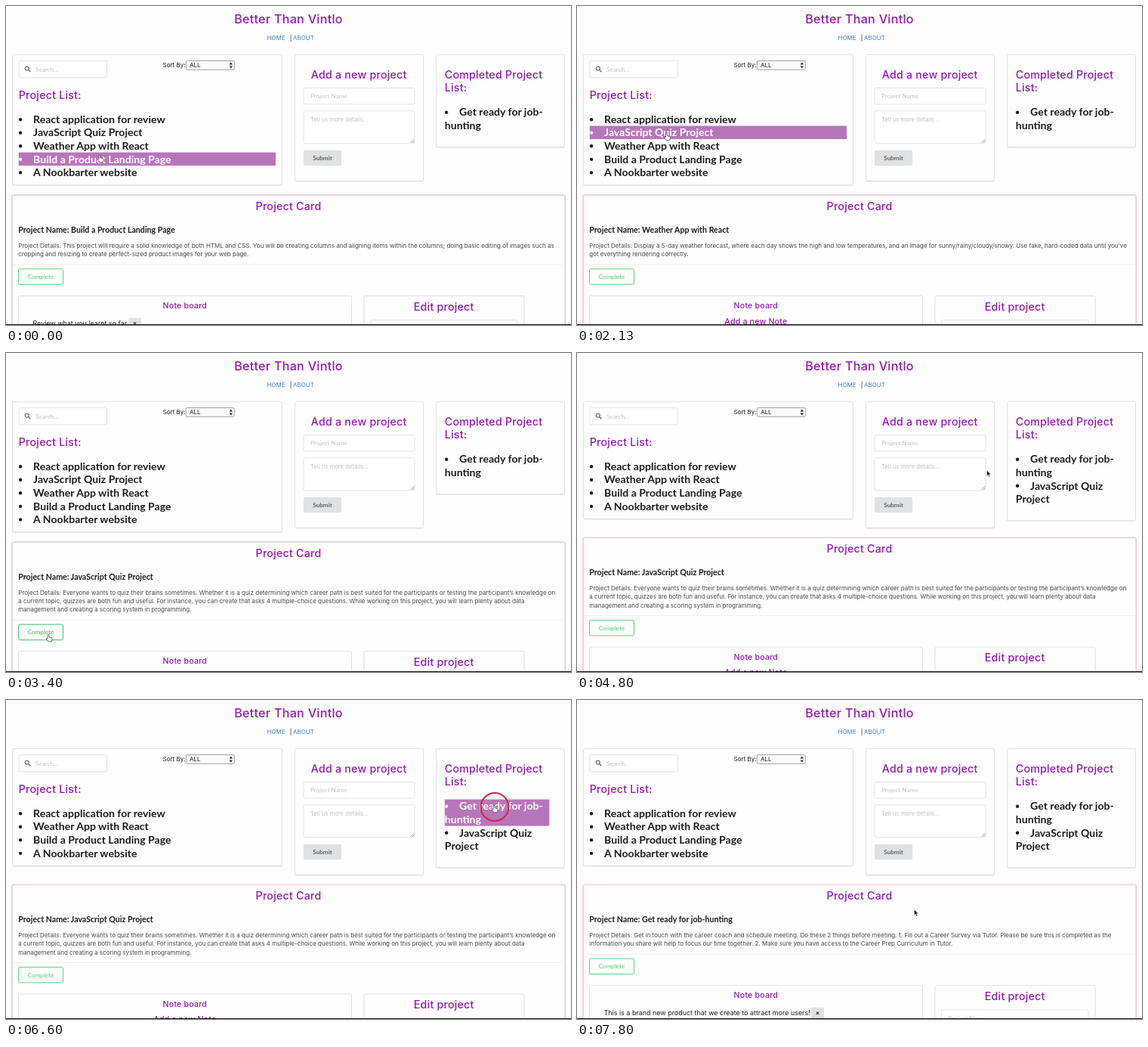
An HTML page for the animation above (7860 ms loop, 748x422 px).

```html
<!DOCTYPE html>
<html lang="en">
<head>
<meta charset="utf-8">
<title>Project board</title>
<style>
  html, body { margin: 0; height: 100%; overflow: hidden; background: #fefefe; }
  svg { display: block; width: 100vw; height: 100vh; }
  text { font: 8px Inter, sans-serif; fill: #1b1c1d; white-space: pre; }
  .title { font-size: 16.1px; }
  .h2 { font-size: 14.15px; }
  .h3 { font-size: 10.6px; }
  .title, .h2, .h3 { font-weight: 500; letter-spacing: .018em; fill: #9319b1; }
  .item { font: bold 14.08px Lato, sans-serif; }
  .name { font: bold 10.63px Lato, sans-serif; }
  .button { font: bold 8.15px Lato, sans-serif; fill: #616263; }
  .hint { font: 8.2px Lato, sans-serif; fill: #c3c3c3; }
  .area { font-size: 7.7px; fill: #c3c3c3; }
  .link { fill: #4183c4; }
  .details { font-size: 7.99px; fill: #484848; }
  .note { font-size: 8.95px; }
  .mid { text-anchor: middle; }
  .on { fill: #fff; }
</style>
</head>
<body>
<svg id="stage" viewBox="0 0 748 422"></svg>
<script>
const LOOP = 7860, STEP = 200 / 3, ROW = 17.55, LINE = 11.3;
const stage = document.getElementById('stage');

const build = {
  name: 'Build a Product Landing Page',
  note: 'Review what you learnt so far', noteEnd: 162,
  lines: ['This project will require a solid knowledge of both HTML and CSS. You will be creating columns and aligning items within the columns; doing basic editing of images such as',
    'cropping and resizing to create perfect-sized product images for your web page.']
};
const weather = {
  name: 'Weather App with React',
  lines: ['Display a 5-day weather forecast, where each day shows the high and low temperatures, and an image for sunny/rainy/cloudy/snowy. Use fake, hard-coded data until you’ve',
    'got everything rendering correctly.']
};
const quiz = {
  name: 'JavaScript Quiz Project',
  lines: ['Everyone wants to quiz their brains sometimes. Whether it is a quiz determining which career path is best suited for the participants or testing the participant’s knowledge on',
    'a current topic, quizzes are both fun and useful. For instance, you can create that asks 4 multiple-choice questions. While working on this project, you will learn plenty about data',
    'management and creating a scoring system in programming.']
};
const job = {
  name: 'Get ready for job-hunting',
  note: 'This is a brand new product that we create to attract more users!', noteEnd: 310,
  lines: ['Get in touch with the career coach and schedule meeting. Do these 2 things before meeting: 1. Fill out a Career Survey via Tutor. Please be sure this is completed as the',
    'information you share will help to focus our time together. 2. Make sure you have access to the Career Prep Curriculum in Tutor.']
};

// Pointer hotspot: [ms, x, y]
const path = [
  [0, 124, 197], [600, 122, 184], [2000, 122, 184], [2130, 118.5, 168], [2260, 118, 166],
  [2730, 118, 166], [3130, 62, 366], [3400, 56, 372], [4340, 56, 372], [4460, 190, 300],
  [4540, 190, 300], [4660, 430, 190], [4730, 480, 176], [4800, 542.5, 155], [5060, 650, 180],
  [5600, 650, 180], [6400, 646, 139], [7270, 646, 139], [7800, 446.4, 277]
];
// Mouse presses: [down, up]
const clicks = [[930, 1060], [2400, 2530], [3730, 3860], [6530, 6800]];

function pointerAt(t) {
  const i = path.findIndex(p => p[0] > t);
  if (i < 0) return path[path.length - 1].slice(1);
  const [t0, x0, y0] = path[i - 1], [t1, x1, y1] = path[i];
  const k = (t - t0) / (t1 - t0);
  return [x0 + (x1 - x0) * k, y0 + (y1 - y0) * k];
}

const text = (x, y, s, cls = '') => `<text x="${x}" y="${y}" class="${cls}">${s}</text>`;
const rect = (x, y, r, b, fill, stroke = 'none', more = '') =>
  `<rect x="${x}" y="${y}" width="${r - x}" height="${b - y}" fill="${fill}" stroke="${stroke}" ${more}/>`;
const box = (x, y, r, b, stroke = '#dedede') => rect(x, y, r, b, '#fff', stroke, 'rx="2" stroke-width=".8"');
const panel = (x, y, r, b) =>
  rect(x, y + 1, r, b + 1, '#e4e4e5', '#eeeeef', 'rx="2"') + rect(x, y, r, b, '#fefefe', '#dcdcdd', 'rx="2" stroke-width=".8"');
const shape = (d, fill, stroke = 'none', width = .7) =>
  `<path d="${d}" fill="${fill}" stroke="${stroke}" stroke-width="${width}" stroke-linejoin="round"/>`;

// One list entry; later lines start at the bullet's edge
function entry(x, y, r, lines, hot) {
  const cls = hot ? 'item on' : 'item';
  return (hot ? rect(x, y, r, y + ROW * lines.length, '#b876ba') : '') +
    `<circle cx="${x + 2.3}" cy="${y + 9.2}" r="2.2" fill="${hot ? '#f6e9f6' : '#1b1c1d'}"/>` +
    lines.map((s, i) => text(i ? x : x + 19.3, y + 13.9 + i * ROW, s, cls)).join('');
}

function header() {
  return text(374, 22.8, 'Better Than Vintlo', 'title mid') +
    text(345.5, 44.7, 'HOME', 'link') + text(375.7, 44.7, '|') + text(380, 44.7, 'ABOUT', 'link');
}

function searchBar() {
  return box(17, 72.3, 133.5, 94.8) +
    '<circle cx="27.8" cy="82.6" r="2.5" fill="none" stroke="#777" stroke-width="1.3"/>' +
    shape('M29.7 84.5l2.6 2.6', 'none', '#777', 1.6) +
    text(39, 87, 'Search...', 'hint') + text(207.5, 81, 'Sort By:') +
    rect(238.3, 72.5, 302.3, 84.3, '#fafafa', '#8d8d8d', 'rx="1.5" stroke-width=".8"') +
    text(243, 81.2, 'ALL') +
    shape('M295.6 77.4l2.2-3 2.2 3zM295.6 79.4l2.2 3 2.2-3z', '#222');
}

function newProject() {
  return panel(382.5, 64.3, 552.5, 231.3) + text(467.2, 95.8, 'Add a new project', 'h2 mid') +
    box(394, 108.4, 541, 130) + text(403, 122, 'Project Name', 'hint') +
    box(394, 138.7, 541, 181.8) + text(403, 153, 'Tell us more details...', 'area') +
    shape('M535.5 181l5-5M538 181l2.5-2.5', 'none', '#777') +
    rect(394, 190.8, 444, 211.3, '#e0e1e2', 'none', 'rx="2"') + text(419, 204, 'Submit', 'button mid');
}

function card(project, shift, hotButton) {
  const { name, lines, note, noteEnd } = project;
  const top = 250.3 + shift;
  const y = 383.4 + shift + (lines.length - 2) * LINE;
  const green = hotButton ? '#2fb650' : '#48cb6b';
  let out = rect(7.6, top - .5, 740.7, 440, '#fefefe', '#f1c3cd', 'rx="2.5"') +
    rect(8.4, top + .2, 739.9, 440, '#fefefe', '#e2c9ce', 'rx="2" stroke-width=".8"') +
    text(374, top + 19.6, 'Project Card', 'h2 mid') +
    text(16.3, top + 49.5, 'Project Name: ' + name, 'name') +
    lines.map((s, i) => text(16.3, top + 69.3 + i * LINE, (i ? '' : 'Project Details: ') + s, 'details')).join('') +
    rect(8.7, y - 41.8, 739.6, y - 41, '#ececec') +
    rect(16.5, y - 35.6, 75.6, y - 15.1, '#fff', green, 'rx="2" stroke-width=".9"') +
    `<text x="46" y="${y - 22.4}" class="button mid" style="fill:${green};font-weight:400">Complete</text>` +
    panel(16.5, y, 457.5, 440) + text(236.8, y + 16.7, 'Note board', 'h3 mid') +
    panel(474, y, 686, 440) + text(579.7, y + 19.4, 'Edit project', 'h2 mid') +
    box(482.5, y + 32.2, 677, y + 53.8) + text(491.5, y + 46, 'Project Name', 'hint');
  if (note) {
    out += text(35.5, y + 39.2, note, 'note') +
      rect(noteEnd, y + 29, noteEnd + 17, y + 44, '#e0e1e2', 'none', 'rx="2"') +
      shape(`M${noteEnd + 6.8} ${y + 34.8}l3.5 3.5m0-3.5l-3.5 3.5`, 'none', '#555', 1.3);
  } else {
    out += text(236.8, y + 37.4, 'Add a new Note', 'h3 mid');
  }
  return out;
}

function cursor(x, y, hand) {
  const drawing = hand
    ? shape('M-.9 .8q.9-1.7 1.8 0v3l3.2 .8q1.3 .4 1 1.8l-.8 3.4h-4.4l-2.8-3.8q0-1.4 1.9-.4z', '#fff', '#333')
    : shape('M0 0v8l1.9-1.7 1.2 2.8 1.3-.6-1.2-2.7h2.5z', '#111', '#fff', .6);
  return `<g transform="translate(${x} ${y})">${drawing}</g>`;
}

function ring(t, x, y) {
  return clicks.filter(([down, up]) => t >= down && t < up + 260).map(([, up]) =>
    `<circle cx="${x + 1}" cy="${y + 2.5}" r="18.5" fill="none" stroke="#cf2744" stroke-width="2" opacity="${Math.min(1, 1 - (t - up) / 260)}"/>`).join('');
}

function render(t) {
  const [x, y] = pointerAt(t);
  const finished = t >= 3860;
  const project = t < 1060 ? build : t < 2530 ? weather : t < 6800 ? quiz : job;
  const todo = ['React application for review', quiz.name, weather.name, build.name, 'A Nookbarter website']
    .filter(s => !finished || s !== quiz.name);
  const done = [['Get ready for job-', 'hunting']];
  if (finished) done.push(['JavaScript Quiz', 'Project']);

  const shift = finished ? -5.7 : 0;
  const within = (l, top, r, b) => x >= l && x < r && y >= top && y < b;
  let hand = false;
  const list = (items, left, top, right) => items.map((lines, i) => {
    const rowTop = top + i * lines.length * ROW;
    const hot = within(left, rowTop, right, rowTop + lines.length * ROW);
    hand = hand || hot;
    return entry(left, rowTop, right, lines, hot);
  }).join('');

  const buttonTop = 347.8 + shift + (project.lines.length - 2) * LINE;
  const hotButton = within(16.5, buttonTop, 75.6, buttonTop + 20.5);

  stage.innerHTML = rect(0, 0, 748, 422, '#fefefe') + header() +
    panel(8.5, 64.3, 365.5, finished ? 219.3 : 236.8) + searchBar() +
    text(16.8, 122.8, 'Project List:', 'h2') + list(todo.map(s => [s]), 16.8, 141, 357) +
    newProject() +
    panel(569.5, 64.3, 739.5, finished ? 221.7 : 186.6) +
    text(580.8, 95.8, 'Completed Project', 'h2') + text(580.8, 113.4, 'List:', 'h2') +
    list(done, 580.8, 131.5, 719.3) +
    card(project, shift, hotButton) + rect(0, 421, 748, 422, '#111') +
    cursor(x, y, hand || hotButton) + ring(t, x, y);
}

let shown = -1;
function tick() {
  const step = Math.floor((performance.now() % LOOP + 7) / STEP);
  if (step !== shown) render((shown = step) * STEP);
  requestAnimationFrame(tick);
}
tick();
</script>
</body>
</html>
```
